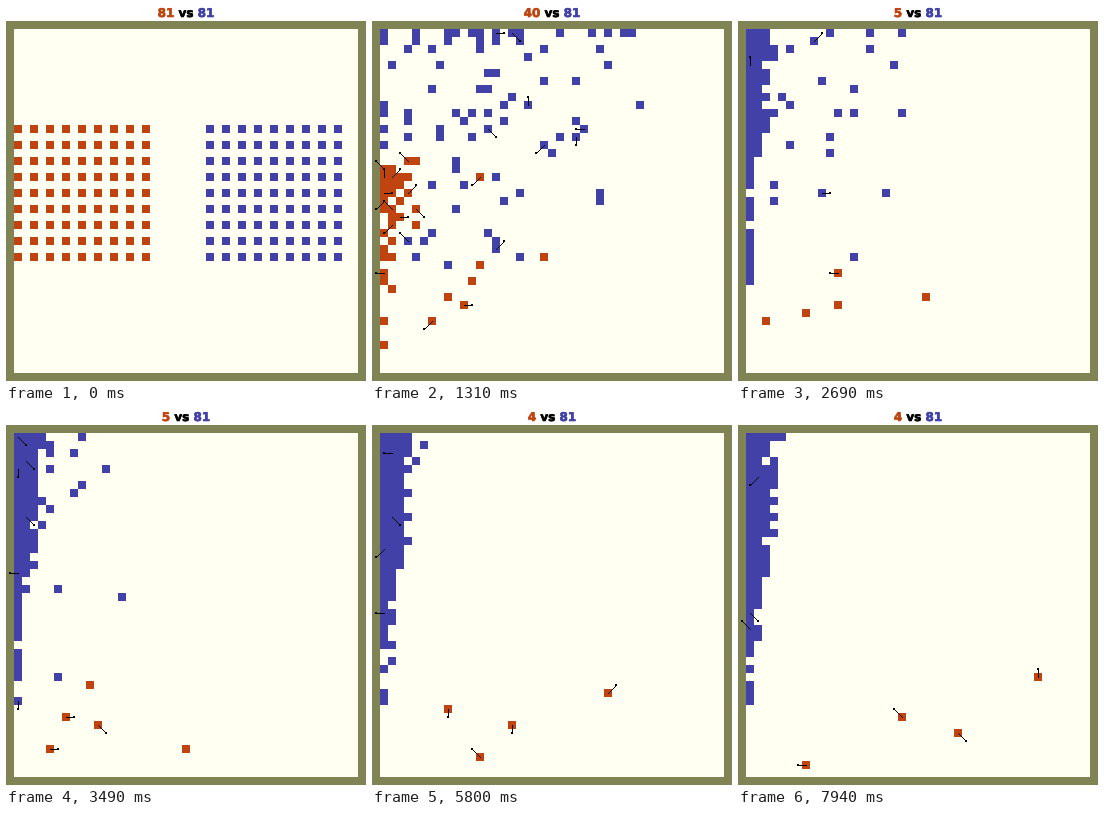
Recreate the animation shown at these times as a matplotlib script. Size 360 px wide and 376 px high, loop 8 s.

```python
import random
import numpy as np
import matplotlib.pyplot as plt
from matplotlib.animation import FuncAnimation
from matplotlib.patheffects import withStroke

W, H, CELL, N, TOP = 360, 376, 8, 43, 15
TICKS, FRAMES, INTERVAL = 280, 400, 20
TICKS_PER_MS = 0.035
RED, BLUE, WALL, FIELD = "#c0440f", "#4141a8", "#808454", "#fffff2"
DIRS = [(x, y) for x in (-1, 0, 1) for y in (-1, 0, 1) if x or y]

# Cells passed by the five longest-living red units
STOPS = [0, 68, 122, 172, 234, 278]
RUNS = [
    [(16, 28), (22, 28), (21, 39), (24, 33), (33, 32), (36, 30)],
    [(12, 28), (12, 30), (9, 31), (10, 32), (22, 39), (26, 37)],
    [(10, 28), (12, 33), (10, 36), (9, 40), (15, 40), (19, 35)],
    [(8, 28), (8, 35), (6, 35), (6, 33), (10, 36), (7, 41)],
    [(2, 28), (0, 34)] + [(4, 39)] * 4,
]

rng = random.Random(14)


def block(left):
    return [(left + 2 * i, 12 + 2 * j) for j in range(9) for i in range(9)]


def gap(a, b):
    return max(abs(a[0] - b[0]), abs(a[1] - b[1]))


def clamp(x, y):
    return min(max(x, 0), N - 1), min(max(y, 0), N - 1)


def stride(speed, noise):
    """One cell along the drift, now and then a stray step."""
    if rng.random() < abs(speed):
        return 1 if speed > 0 else -1
    return rng.choice((-1, 0, 0, 1)) if rng.random() < noise else 0


class Unit:
    def __init__(self, pos, vx, vy, noise):
        self.pos, self.noise = pos, noise
        self.vx, self.vy = rng.uniform(*vx), rng.uniform(*vy)

    def move(self, tick, taken):
        x, y = self.pos
        calm = np.interp(tick, [27, 50], [1, 0])
        dx, dy = stride(self.vx, self.noise), stride(self.vy * calm, self.noise)
        side = rng.choice((-1, 1))
        # When the way is blocked, slip past it to one side.
        for step in ((dx, dy), (dx, side), (0, side)):
            new = clamp(x + step[0], y + step[1])
            if new == self.pos:
                return
            if new not in taken:
                taken.remove(self.pos)
                taken.add(new)
                self.pos = new
                return


def runner_cell(run, tick):
    xs, ys = zip(*run)
    return (round(float(np.interp(tick, STOPS, xs))),
            round(float(np.interp(tick, STOPS, ys))))


def red_count(tick):
    left = np.interp(tick, [8, 27, 68, 86, 154, 155], [81, 66, 8, 5, 5, 4])
    return int(np.ceil(left))


def pick_swords(cells, rate):
    return [(*cell, *rng.choice(DIRS)) for cell in cells if rng.random() < rate]


def simulate():
    """Blue sweeps north-west and piles up at the wall; red is worn down."""
    blues = [Unit(p, (-0.6, -0.25), (-0.7, 0.08), 0.15) for p in block(24)]
    starts = [run[0] for run in RUNS]
    reds = [Unit(p, (-0.3, 0.15), (-0.35, 0.3), 0.4)
            for p in block(0) if p not in starts]
    runs = RUNS[:]
    history = []
    for tick in range(TICKS):
        if tick:
            taken = {u.pos for u in blues + reds}
            for u in sorted(blues + reds, key=lambda u: u.pos):
                u.move(tick, taken)
        while len(reds) + len(runs) > red_count(tick):
            if reds:
                reds.remove(min(reds, key=lambda u: min(
                    gap(u.pos, b.pos) for b in blues)))
            else:
                runs.pop()
        blue_cells = [u.pos for u in blues]
        red_cells = [u.pos for u in reds] + [runner_cell(r, tick) for r in runs]
        blue_rate = np.interp(tick, [0, 27, 68, 280], [0, 0.2, 0.07, 0.04])
        red_rate = np.interp(tick, [0, 27, 68], [0, 0.3, 0.5])
        swords = (pick_swords(blue_cells, blue_rate)
                  + pick_swords(red_cells, red_rate))
        history.append((blue_cells, red_cells, swords))
    return history


def rgb(color):
    return [int(color[i:i + 2], 16) for i in (1, 3, 5)]


def paint(blues, reds, swords):
    grid = np.empty((N + 2, N + 2, 3), np.uint8)
    grid[:] = rgb(WALL)
    grid[1:-1, 1:-1] = rgb(FIELD)
    for cells, color in ((blues, BLUE), (reds, RED)):
        for c, r in cells:
            grid[r + 1, c + 1] = rgb(color)
    stage = np.full((H, W, 3), 255, np.uint8)
    stage[TOP:TOP + W] = grid.repeat(CELL, 0).repeat(CELL, 1)
    for c, r, dx, dy in swords:
        x, y = 12 + CELL * c, 27 + CELL * r
        for i in range(CELL + 1):
            stage[y + dy * i, x + dx * i] = 0
        x, y = x + dx * CELL, y + dy * CELL
        stage[y - 1:y + 1, x - 1:x + 1] = 0
    return stage


history = simulate()

DPI = 100
PX = 72 / DPI
fig = plt.figure(figsize=(W / DPI, H / DPI), dpi=DPI, facecolor="white")
ax = fig.add_axes([0, 0, 1, 1])
ax.axis("off")
image = ax.imshow(paint(*history[0]), extent=(0, W, H, 0),
                  interpolation="nearest", aspect="auto")

# Advance widths of the heading's parts
EM = 12
DIGIT, SPACE, VS = 0.696 * EM, 0.348 * EM, 1.247 * EM


def label(text, color):
    return ax.text(0, 11, text, color=color, fontsize=EM * PX,
                   family="DejaVu Sans", weight="bold", va="baseline",
                   path_effects=[withStroke(linewidth=0.6 * PX, foreground=color)])


red_text, vs_text, blue_text = label("", RED), label("vs", "black"), label("", BLUE)


def set_score(reds, blues):
    a, b = str(reds), str(blues)
    x = W / 2 - ((len(a) + len(b)) * DIGIT + 2 * SPACE + VS) / 2
    red_text.set_text(a)
    red_text.set_x(x)
    x += len(a) * DIGIT + SPACE
    vs_text.set_x(x)
    blue_text.set_text(b)
    blue_text.set_x(x + VS + SPACE)


def update(frame):
    tick = min(TICKS - 1, int(frame * INTERVAL * TICKS_PER_MS + 0.5))
    blues, reds, swords = history[tick]
    image.set_data(paint(blues, reds, swords))
    set_score(len(reds), len(blues))
    return image, red_text, vs_text, blue_text


anim = FuncAnimation(fig, update, frames=FRAMES, interval=INTERVAL,
                     repeat=True, repeat_delay=0, blit=False)
plt.show()
```
